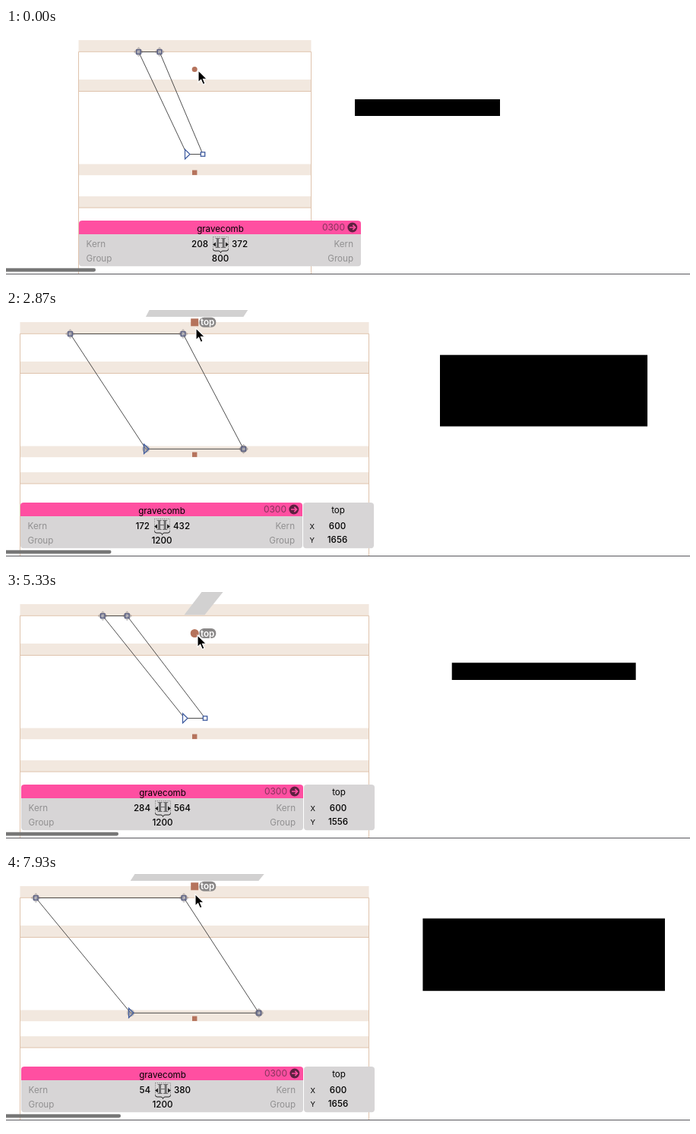
Write an HTML page that moves like this. It is 900 px wide and 335 px high and loops after 8000 ms.

```html
<!DOCTYPE html>
<html lang="en">
<head>
<meta charset="utf-8">
<title>Accent anchors</title>
<style>
  html, body { margin: 0; width: 100%; height: 100%; overflow: hidden; background: #fff; }
  svg { display: block; width: 900px; height: 335px; }
  text { font: 11.6px Inter, Roboto, sans-serif; }
  .mid { text-anchor: middle; }
  .end { text-anchor: end; }
  .dim { fill: #919091; }
  .num { font-weight: 500; }
  .tag { font-weight: 600; fill: #fff; }
</style>
</head>
<body>
<svg id="stage" viewBox="0 0 900 335"></svg>
<script>
const LOOP = 8000;
const CENTER = 248.2;
const BOTTOM_ANCHOR = 190.7;
const INK = '#b5735c', BLUE = '#3d5a9e', BAND = '#f2e8df', EDGE = '#dfc3ac';

// quad: x of top left, top right, bottom right, bottom left
const scenes = [
  { from: 0, pick: 500, left: 95.5, right: 401.5, low: 222, quad: [174.5, 202, 259, 238], base: 166.5,
    box: [459, 94, 191, 22], panel: 96, bar: 118, kern: [208, 372], width: 800, heavy: false },
  { from: 1870, pick: 2870, left: 18.5, right: 477.5, low: 214, quad: [84.5, 233, 312.5, 184], base: 183.3,
    box: [571, 59.3, 273, 94.2], panel: 19, bar: 138.5, kern: [172, 432], width: 1200, heavy: true },
  { from: 4400, pick: 5330, left: 18.5, right: 477.5, low: 222, quad: [127.3, 159.3, 262, 235], base: 166.5,
    box: [586.7, 93.3, 242, 22.7], panel: 20, bar: 148, kern: [284, 564], width: 1200, heavy: false },
  { from: 6530, pick: 7870, left: 18.5, right: 477.5, low: 214, quad: [39.3, 234, 332.7, 164], base: 183.3,
    box: [548.4, 58.6, 318.6, 95.6], panel: 20, bar: 151, kern: [54, 380], width: 1200, heavy: true }
];

// pointer stops: time, x, y
const stops = [
  [0, 253, 56], [930, 253, 56], [1400, 249, 186.5], [2070, 249, 186.5], [2600, 250, 24],
  [2940, 250, 24], [3470, 258.5, 190], [4130, 258.5, 190], [4330, 252.5, 189.5], [4600, 252.5, 189.5],
  [5150, 252, 57], [5420, 252, 57], [5930, 250.5, 191], [7000, 250.5, 191], [7600, 249, 26.5], [LOOP, 249, 26.5]
];

const rect = (x, y, w, h, fill, extra = '') =>
  `<rect x="${x}" y="${y}" width="${w}" height="${h}" fill="${fill}" ${extra}/>`;
const path = (d, fill, stroke = 'none', w = 1) =>
  `<path d="${d}" fill="${fill}" stroke="${stroke}" stroke-width="${w}"/>`;
const text = (x, y, s, cls = '', extra = '') =>
  `<text x="${x}" y="${y}" class="${cls}" ${extra}>${s}</text>`;

function grid({ left, right, low }) {
  const w = right - left;
  const band = (y, h) => rect(left, y, w, h, BAND);
  return band(16, 15) + band(68, 15) + band(179.5, 14.7) + band(low, 15) +
    path(`M${left} 324V31.3H${right}V324M${left} 83.5H${right}M${left} ${low + 15}H${right}`, 'none', EDGE);
}

// the matching accent, mirrored and set on the top anchor
function ghost({ quad: [a, b, c, d], base, heavy }) {
  const dy = (heavy ? 16.3 : 54.5) - BOTTOM_ANCHOR;
  const pt = (x, y) => `${2 * CENTER - x} ${y + dy}`;
  return path(`M${pt(a, 31.5)}L${pt(b, 31.5)}L${pt(c, base)}L${pt(d, base)}Z`, '#d2d1d1');
}

function node(x, y, zone) {
  const halo = zone ? path(`M${x - 6.5} ${y}l6.5 -6.5l6.5 6.5l-6.5 6.5z`, 'rgba(110,105,110,.4)') : '';
  return halo + rect(x - 2.7, y - 2.7, 5.4, 5.4, zone ? 'rgba(190,190,200,.6)' : '#fff', `stroke="${zone ? '#53597f' : BLUE}" stroke-width="1.3"`);
}

function outline({ quad: [a, b, c, d], base, heavy }) {
  const halo = heavy
    ? [c, d].map(x => `<circle cx="${x}" cy="${base}" r="5" fill="rgba(110,105,110,.35)"/>`).join('') : '';
  return path(`M${a} 31.5H${b}L${c} ${base}H${d}Z`, 'none', '#3a3a3a', 0.9) + halo +
    node(a, 31.5, true) + node(b, 31.5, true) + node(c, base, heavy) +
    path(`M${d - 2.5} ${base - 6.3}v12.6l6.5 -6.3z`, heavy ? 'rgba(150,150,165,.4)' : '#fff', BLUE, 1.2);
}

function anchors({ heavy }, picked) {
  const y = heavy ? 16.3 : 54.5;
  const r = picked ? (heavy ? 5 : 5.5) : (heavy ? 3.2 : 3.5);
  const top = heavy ? rect(CENTER - r, y - r, 2 * r, 2 * r, INK)
    : `<circle cx="${CENTER}" cy="${y}" r="${r}" fill="${INK}"/>`;
  const tag = rect(254.3, y - 6.5, 22, 13, '#8a8888', 'rx="6"') + text(265.2, y + 4, 'top', 'mid tag');
  return rect(CENTER - 3.2, BOTTOM_ANCHOR - 3.2, 6.4, 6.4, INK) + top + (picked ? tag : '');
}

function widthIcon() {
  return path('M176.5 275.5V293M196.5 275.5V293M176.5 275.5H196.5', 'none', '#777').replace('/>', ' stroke-dasharray="1 1.5"/>') +
    text(186.4, 290, 'H', 'mid', 'style="font:bold 18px Noto Serif,serif" fill="#6c6b6c"') +
    path('M176 285.5l4 -3v6zM197 285.5l-4 -3v6z', '#222') +
    path('M176.5 291.5q0 2.5 2.5 2.5h5q2 0 2.5 2.5q.5 -2.5 2.5 -2.5h5q2.5 0 2.5 -2.5', 'none', '#222');
}

function panel({ panel: x, kern, width, heavy }, picked) {
  const side = !picked ? '' :
    rect(372, 254, 93, 60.3, '#d7d5d6', 'rx="4"') +
    text(418, 268.3, 'top', 'mid') +
    text(380.5, 289, 'X', '', 'style="font-size:9.5px"') + text(380.5, 307.3, 'Y', '', 'style="font-size:9.5px"') +
    text(417, 289.2, width / 2, 'mid num') + text(417, 307.4, heavy ? 1656 : 1556, 'mid num');
  return `<g transform="translate(${x} 0)">` +
    path('M0 272H371V310.3q0 4 -4 4H4q-4 0 -4 -4z', '#d7d5d6') +
    path('M0 272V258q0 -4 4 -4H367q4 0 4 4V272z', '#ff4fa1') +
    text(186, 268.6, 'gravecomb', 'mid') +
    text(350, 267.4, '0300', 'end', 'fill="#85345c" style="font-size:12px"') +
    '<circle cx="359.8" cy="263" r="6.4" fill="#5d2040"/>' +
    path('M356 263H363M360.3 259.8L363.5 263L360.3 266.2', 'none', '#ff4fa1', 1.7) +
    text(9.6, 289.2, 'Kern', 'dim') + text(9.6, 308.2, 'Group', 'dim') +
    text(361, 289.2, 'Kern', 'end dim') + text(361, 308.2, 'Group', 'end dim') +
    text(170, 289.2, kern[0], 'end num') + text(201, 289.2, kern[1], 'num') +
    text(186, 308.2, width, 'mid num') + widthIcon() + side + '</g>';
}

function draw(s, picked) {
  return grid(s) + (picked ? ghost(s) : '') + outline(s) + anchors(s, picked) +
    rect(...s.box, '#000') + panel(s, picked) +
    path(`M0 316.8H${s.bar - 2.3}a2.3 2.3 0 0 1 0 4.6H0z`, '#767676') +
    rect(0, 324, 900, 1, '#57565c');
}

function pointerAt(t) {
  const i = stops.findIndex(p => p[0] > t);
  const [t0, x0, y0] = stops[i - 1], [t1, x1, y1] = stops[i];
  const u = (t - t0) / (t1 - t0), k = u * u * (3 - 2 * u);
  return [x0 + (x1 - x0) * k, y0 + (y1 - y0) * k];
}

const stage = document.getElementById('stage');
stage.innerHTML = '<g id="view"></g><g id="pointer">' +
  path('M0 0V15.6L3.6 12.2L6.3 18.4L9 17.2L6.4 11.2H11.2Z', '#000', '#fff', 1.1) + '</g>';
const view = document.getElementById('view');
const pointer = document.getElementById('pointer');
let shown = '';

function render(t) {
  const s = scenes.findLast(v => t >= v.from);
  const picked = t >= s.pick;
  const key = s.from + ':' + picked;
  if (key !== shown) view.innerHTML = draw(s, picked);
  shown = key;
  pointer.setAttribute('transform', `translate(${pointerAt(t)})`);
}

const start = performance.now();
function tick() {
  render((performance.now() - start) % LOOP);
  requestAnimationFrame(tick);
}
tick();
</script>
</body>
</html>
```
